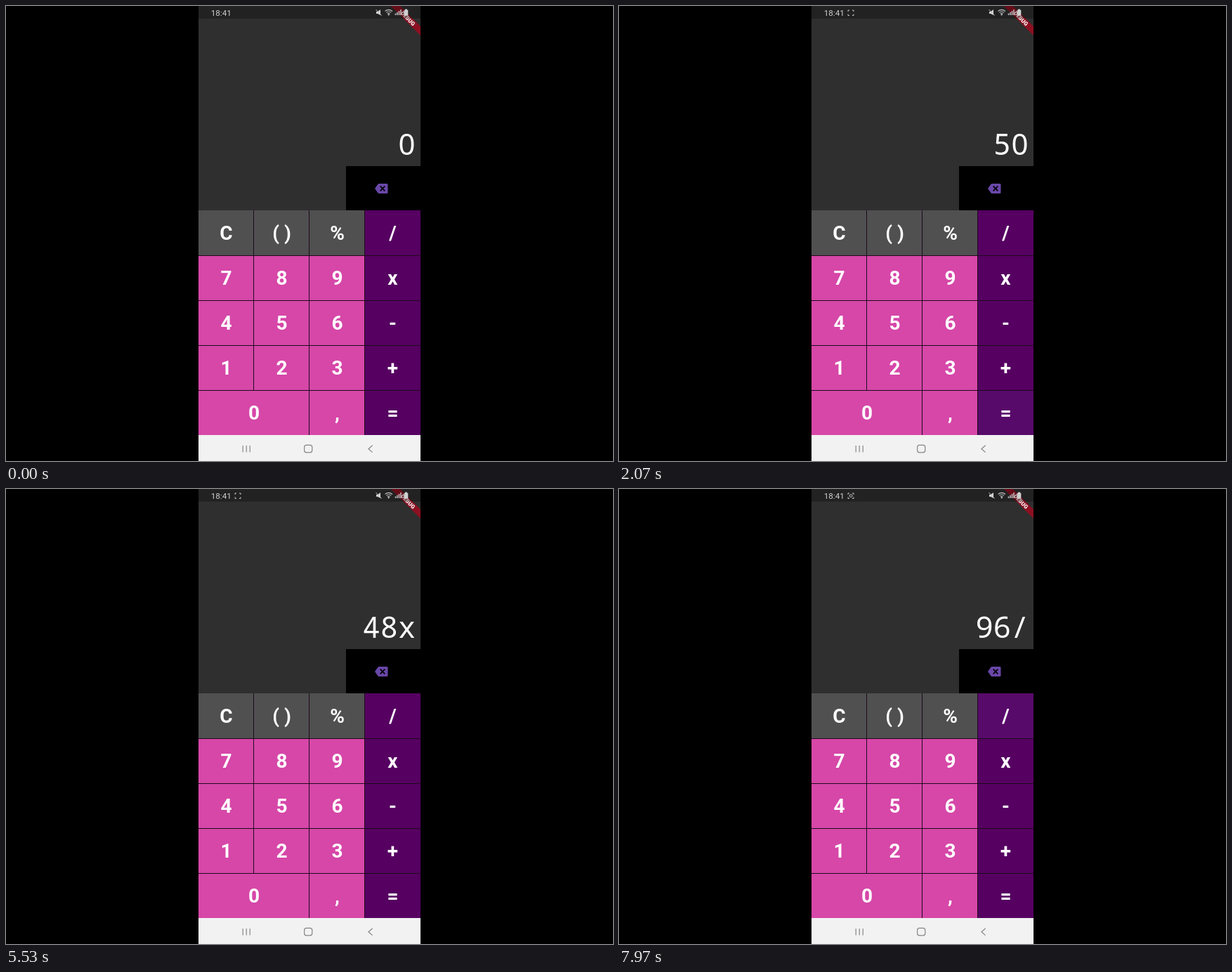
Write an HTML page that moves like this. It is 864 px wide and 648 px high and loops after 8000 ms.

```html
<!DOCTYPE html>
<html lang="en">
<head>
<meta charset="utf-8">
<title>Calculator</title>
<style>
  html, body { margin: 0; width: 100%; height: 100%; overflow: hidden; background: #000; }
  svg { display: block; width: 100vw; height: 100vh; }
  text { fill: #fff; text-anchor: middle; }
  .key { font: 700 28px Roboto, sans-serif; }
  .digit { font: 400 42px "Noto Sans Mono", "DejaVu Sans Mono", monospace; }
  .digit.zero { font-family: "Noto Sans", "Open Sans", sans-serif; }
  .clock { font: 400 11.6px Roboto, sans-serif; fill: #d0d0d0; text-anchor: start; }
  .debug { font: 900 7.9px Roboto, sans-serif; }
</style>
</head>
<body>
<svg id="stage" viewBox="0 0 864 648">
  <defs>
    <clipPath id="phone"><rect x="274" width="316" height="648"/></clipPath>
  </defs>
  <rect width="864" height="648" fill="#000"/>
  <rect x="274" width="316" height="291" fill="#2f2f2f"/>
  <rect x="484" y="228" width="106" height="63.5" fill="#000"/>
  <path d="M525 260L529.6 253.4Q530 253 530.8 253H542Q543.5 253 543.5 254.5V265.5Q543.5 267 542 267H530.8Q530 267 529.6 266.6Z" fill="#6947a8"/>
  <path d="M532.7 256.7l6.6 6.6m0-6.6l-6.6 6.6" stroke="#000" stroke-width="1.7"/>

  <g id="keys"></g>
  <g id="ripples"></g>
  <path id="grid" fill="none" stroke="#1d0a1c"/>
  <g id="labels"></g>
  <g id="display"></g>

  <g clip-path="url(#phone)">
    <g transform="translate(572.2 17.8) rotate(45)">
      <rect x="-40" y="-4.6" width="80" height="9.2" fill="#8c1022"/>
      <text class="debug" y="2.8">DEBUG</text>
    </g>
  </g>
  <rect x="274" width="316" height="18" fill="#000" opacity=".27"/>

  <text class="clock" x="291.8" y="13.6">18:41</text>
  <g fill="none" stroke="#c4c4c4">
    <path id="corners" d="M326 8V6H328M332 6H334V8M334 11.5V13.5H332M328 13.5H326V11.5"/>
    <rect id="lens" x="328.3" y="8" width="3.6" height="3.4" rx="1"/>
    <path d="M526.5 5l8.2 8.6"/>
    <path d="M539.5 7.4Q544.5 3.3 550 7.4M541.3 9.4Q544.7 6.6 548.2 9.4M543 11.3Q544.7 10 546.4 11.3" stroke-width="1.2"/>
    <path d="M554.5 13V10.5M557 13V8.8M559.5 13V7M562 13V5" stroke-width="1.5"/>
  </g>
  <g fill="#d0d0d0">
    <path d="M527 8H529L533 5V13L529 11H527Z"/>
    <circle cx="544.7" cy="12.6" r="1"/>
    <path d="M568 4.5h3v1.2h1.3v8h-5.6v-8h1.3z"/>
  </g>

  <rect x="274" y="611" width="316" height="37" fill="#f2f2f2"/>
  <g fill="none" stroke="#858585" stroke-width="1.2">
    <path d="M337.2 626V635.5M342.2 626V635.5M347.2 626V635.5"/>
    <rect x="424.6" y="625.4" width="11.2" height="10.4" rx="3"/>
    <path d="M521.6 625.8L516 630.7L521.6 635.6"/>
  </g>
</svg>
<script>
const LOOP = 8000;
const NS = "http://www.w3.org/2000/svg";
const byId = id => document.getElementById(id);

function add(parent, tag, attrs, content) {
  const el = document.createElementNS(NS, tag);
  for (const name in attrs) el.setAttribute(name, attrs[name]);
  if (content) el.textContent = content;
  parent.append(el);
  return el;
}

// Keypad
const LEFT = 274, TOP = 291, COL = 79, ROW = 64;
const rows = [["C", "( )", "%", "/"], ["7", "8", "9", "x"], ["4", "5", "6", "-"],
              ["1", "2", "3", "+"], ["0", "", ",", "="]];
const keys = {};
let gridPath = "";

rows.forEach((labels, r) => labels.forEach((label, c) => {
  if (!label) return;
  const x = LEFT + c * COL, y = TOP + r * ROW;
  const width = label === "0" ? 2 * COL : COL;
  const fill = c === 3 ? "#560062" : r === 0 ? "#505050" : "#d647a8";
  const cx = x + width / 2, cy = y + ROW / 2;
  add(byId("keys"), "rect", { x, y, width, height: ROW, fill });
  add(byId("labels"), "text", { class: "key", x: cx, y: cy + 10 }, label);
  if (c < 3) gridPath += `M${x + width - .5} ${y}v${ROW}`;
  if (r) gridPath += `M${x} ${y + .5}h${width}`;

  const id = `cell${r}${c}`;
  const clip = add(byId("ripples"), "clipPath", { id });
  add(clip, "rect", { x, y, width, height: ROW });
  keys[label] = add(byId("ripples"), "circle",
    { cx, cy, r: 0, fill: "#6750a4", opacity: 0, "clip-path": `url(#${id})` });
}));
byId("grid").setAttribute("d", gridPath);

// Taps: time, key, display afterwards
const TAP = 80;
const taps = [
  [90, "2", "2"], [450, "5", "25"], [860, "+", "25+"], [1170, "2", "25+2"],
  [1480, "5", "25+25"], [1850, "=", "50"], [2780, "-", "50-"],
  [3670, "2", "50-2"], [4280, "=", "48"], [4800, "x", "48x"],
  [5540, "2", "48x2"], [5860, "=", "96"], [6560, "/", "96/"], [7780, "/", "96/"]
];

const clamp = v => Math.max(0, Math.min(1, v));
const easeOut = v => 1 - (1 - v) ** 3;
let shown = null;

function showText(value) {
  if (value === shown) return;
  shown = value;
  const display = byId("display");
  display.replaceChildren();
  [...value].forEach((ch, i) => add(display, "text", {
    class: ch === "0" ? "digit zero" : "digit",
    x: 570.6 - (value.length - 1 - i) * 25.2,
    y: 212
  }, ch));
}

function render(t) {
  let value = "0";
  for (const label in keys) keys[label].setAttribute("opacity", 0);
  for (const [start, label, result] of taps) {
    const age = t - start;
    if (age >= TAP) value = result;
    if (age < 0 || age > 400) continue;
    const strength = clamp(age / 75) * clamp((400 - age) / 150);
    keys[label].setAttribute("r", 15 + 40 * easeOut(clamp(age / 200)));
    keys[label].setAttribute("opacity", .13 * strength);
  }
  showText(value);

  // Recording icon blinks twice a second
  const recording = t >= 30;
  const phase = (t - 30 + 500) % 500;
  byId("corners").setAttribute("opacity", recording ? 1 : 0);
  byId("lens").setAttribute("opacity", recording && phase >= 240 ? 1 : 0);
}

const began = performance.now();
function tick() {
  render((performance.now() - began) % LOOP);
  requestAnimationFrame(tick);
}
render(0);
requestAnimationFrame(tick);
</script>
</body>
</html>
```
